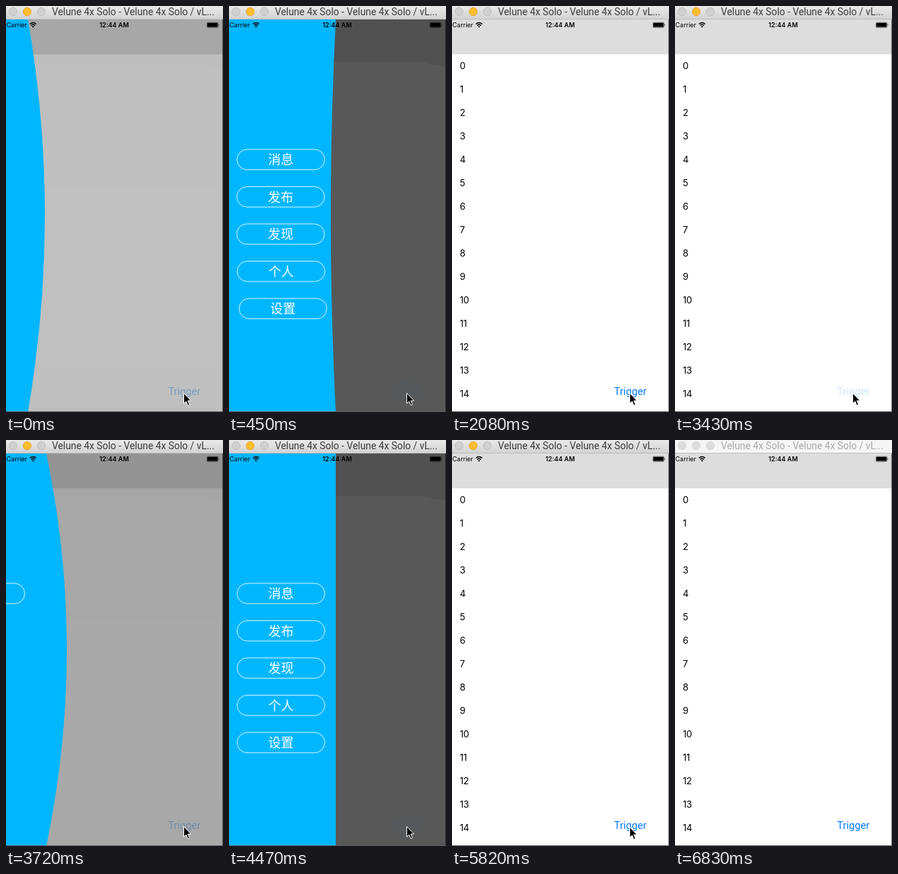
Animation, 307 px wide and 572 px high, one loop 6930 ms. Source, as an HTML page:

```html
<!DOCTYPE html>
<html lang="zh-CN">
<head>
<meta charset="utf-8">
<title>Slide menu</title>
<style>
html, body { margin: 0; width: 100%; height: 100%; overflow: hidden; background: #fff; }
svg { display: block; width: 307px; height: 572px; }
.ui { font-family: Inter, sans-serif; }
.label { font-family: Roboto, sans-serif; }
.cjk { font: 300 18px "Noto Sans CJK SC", "Noto Sans CJK", sans-serif; }
</style>
</head>
<body>
<svg viewBox="0 0 307 572" xmlns="http://www.w3.org/2000/svg">
  <defs>
    <linearGradient id="bar" x1="0" y1="0" x2="0" y2="1">
      <stop offset="0" stop-color="#e9e9e9"/><stop offset="1" stop-color="#d2d2d2"/>
    </linearGradient>
    <filter id="soft"><feGaussianBlur stdDeviation="3"/></filter>
  </defs>
  <rect y="19" width="307" height="553" fill="#fff"/>
  <rect y="19" width="307" height="49" fill="#ddd"/>
  <g id="list" class="ui" font-size="13" letter-spacing="-.3"></g>
  <text id="trigger" class="label" x="229.3" y="547.6" font-size="14.7">Trigger</text>
  <g id="shade">
    <rect y="19" width="307" height="553" fill="#585858"/>
    <path d="M0 19H307V85Q286 84 275 79H0Z" fill="#515151"/>
    <ellipse cx="252" cy="543" rx="22" ry="14" fill="#54585b" filter="url(#soft)"/>
  </g>
  <path id="sheet" fill="#00b7ff"/>
  <g id="menu" class="cjk" fill="#fff" text-anchor="middle"></g>
  <path d="M306.5 19V572" stroke="#000" stroke-opacity=".5"/>
  <path d="M0 571.5H307" stroke="#5c5c5c"/>
  <g class="ui" font-size="9" fill="#000">
    <text x=".5" y="30">Carrier</text>
    <text x="153" y="30" text-anchor="middle" font-weight="600">12:44 AM</text>
    <g fill="none" stroke="#000" stroke-width="1.4">
      <path d="M33.9 25.6Q38.3 21.4 42.7 25.6M35.6 27.5Q38.3 25 41 27.5"/>
    </g>
    <path d="M36.8 28.9Q38.3 27.6 39.8 28.9L38.3 30.6Z"/>
    <rect x="284.3" y="23.3" width="15.6" height="6.9" rx="1.4" fill="none" stroke="#000" stroke-width=".6"/>
    <rect x="285" y="24" width="14.2" height="5.5" rx=".6"/>
    <path d="M300.7 25.2Q302.4 26.7 300.7 28.2Z"/>
  </g>
  <rect id="titlebar" width="307" height="19"/>
  <path d="M0 18.5H307" stroke="#bdbdbd"/>
  <g id="lights"></g>
  <text id="title" class="label" x="65" y="13.3" font-size="13.85">Velune 4x Solo - Velune 4x Solo / vL...</text>
  <path id="cursor" d="M0 0V14.6L3.3 11.5L5.7 17.2L8.1 16.1L5.7 10.6H10.2Z" fill="#000" stroke="#fff" stroke-linejoin="round"/>
</svg>
<script>
const LOOP = 6930, OPEN = 151;
const $ = id => document.getElementById(id);
const set = (el, attrs) => { for (const k in attrs) el.setAttribute(k, attrs[k]); return el; };
const add = (parent, tag, attrs, text = '') => {
  const el = set(document.createElementNS('http://www.w3.org/2000/svg', tag), attrs);
  el.textContent = text;
  return parent.appendChild(el);
};

// time, edge x, bulge, dim amount
const poses = [
  [0, 31, 24, .377], [150, OPEN, 23.5, 1], [300, OPEN, -19, 1], [450, OPEN, -7, 1],
  [600, OPEN, 0, 1], [750, OPEN, 0, 1], [890, OPEN, 0, 1],
  [1930, 58, -16, .42], [2080, -60, 0, 0],
  [3720, 57, 29, .515], [3870, OPEN, 15.5, 1], [4020, OPEN, -15, 1], [4170, OPEN, -4, 1],
  [4320, OPEN, 0, 1], [4470, OPEN, 0, 1],
  [5520, 149, 0, 1], [5670, 66, -16, .45], [5820, -60, 0, 0]
];
// time, cursor x, cursor y
const cursorSteps = [
  [0, 251.5, 545.5], [1640, 251.5, 544.5], [2080, 251.5, 545.5], [3720, 251.5, 544.5],
  [5820, 251.5, 545.5], [6120, 256, 561.5], [6270, 256, 600]
];
const stepAt = (steps, t) => steps.filter(s => s[0] <= t).pop();

for (let i = 0; i < 15; i++) add($('list'), 'text', { x: 11, y: 88.5 + 33 * i }, i);
const buttons = ['消息', '发布', '发现', '个人', '设置'].map((name, i) => {
  const g = add($('menu'), 'g', {}), y = 202 + 52.5 * i;
  add(g, 'rect', {
    x: 11.5, y, width: 124, height: 28.7, rx: 14.35,
    fill: 'none', stroke: '#fff', 'stroke-width': .85
  });
  add(g, 'text', { x: 73.5, y: y + 21 }, name);
  return g;
});
const lights = [10, 30, 50].map(cx => add($('lights'), 'circle', { cx, cy: 8, r: 5.7 }));

// Damped spring from -90 to rest
const spring = ms => {
  const s = Math.max(0, ms) / 1000;
  return -90 * Math.exp(-12 * s) * Math.cos(14 * s);
};

function draw(t) {
  const [at, edge, bulge, dim] = stepAt(poses, t);
  const closed = dim === 0;
  const pressed = t >= 3430 && t < 3720;

  set($('shade'), { opacity: dim });
  set($('list'), { visibility: closed ? 'visible' : 'hidden' });
  set($('trigger'), { fill: pressed ? '#cce4ff' : closed ? '#007aff' : '#90c8ff' });

  set($('sheet'), { d: `M0 19H${edge}Q${edge + 2 * bulge} 295.5 ${edge} 572H0Z` });
  const age = at - (at < 3000 ? -60 : 3640);
  set($('menu'), { visibility: closed ? 'hidden' : 'visible' });
  buttons.forEach((b, i) =>
    set(b, { transform: `translate(${edge - OPEN + spring(age - 60 * i)})` }));

  const active = t < 6830;
  set($('titlebar'), { fill: active ? 'url(#bar)' : '#f5f5f5' });
  set($('title'), { fill: active ? '#3c3c3c' : '#aaa' });
  lights.forEach((l, i) => {
    const lit = active && i === 1;
    set(l, {
      fill: lit ? '#ffbd2e' : active ? '#d0d0d0' : '#dcdcdc',
      stroke: lit ? '#e2a02a' : active ? '#b9b9b9' : '#d2d2d2',
      'stroke-width': .8
    });
  });

  const [, x, y] = stepAt(cursorSteps, t);
  set($('cursor'), { transform: `translate(${x} ${y})` });
}

const start = performance.now();
function tick() {
  draw((performance.now() - start) % LOOP);
  requestAnimationFrame(tick);
}
tick();
</script>
</body>
</html>
```
